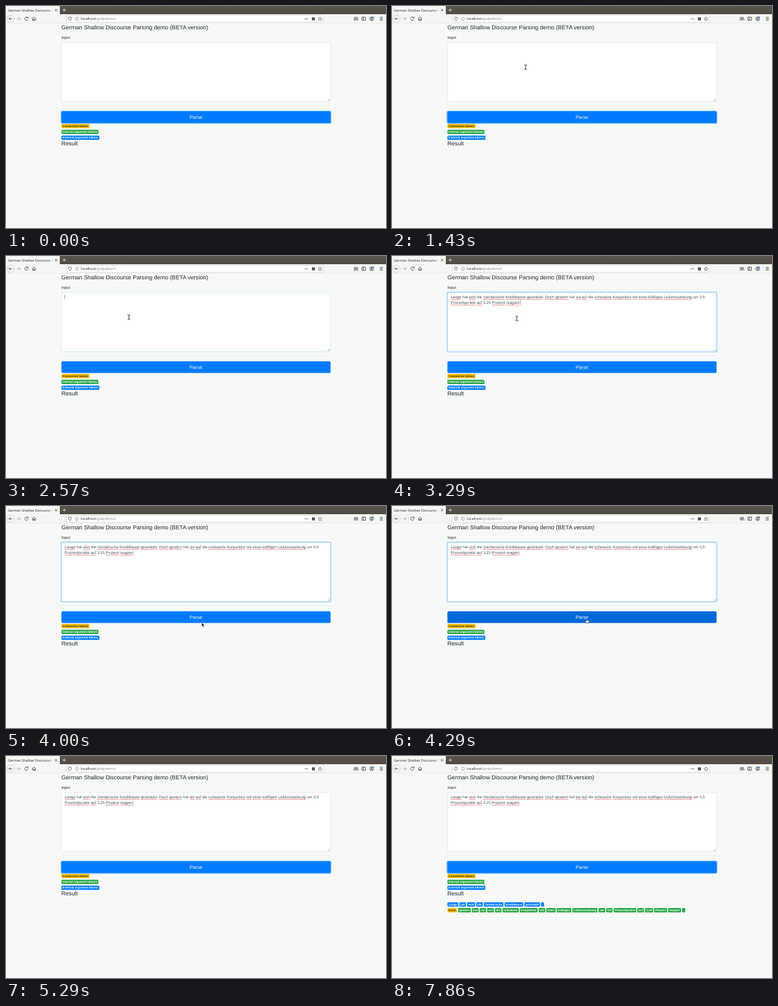
Animation of 600 by 352 pixels, one loop 8000 ms. Source, as an HTML page:

```html
<!DOCTYPE html>
<html lang="en">
<head>
<meta charset="utf-8">
<title>German Shallow Discourse Parsing demo</title>
<style>
  html, body { margin: 0; height: 100%; overflow: hidden; background: #f7f9f8; }
  svg { display: block; width: 100vw; height: 100vh; }
  text { font-family: "Liberation Sans", Arial, sans-serif; text-rendering: geometricPrecision; white-space: pre; }
  .ui { font-family: "Open Sans", "Noto Sans", sans-serif; }
  .icon { fill: none; stroke: #4a4a4a; stroke-width: .9; }
</style>
</head>
<body>
<svg id="stage" viewBox="0 0 600 352">
  <defs>
    <linearGradient id="bar" x2="0" y2="1">
      <stop stop-color="#59554d"/><stop offset="1" stop-color="#4f4b44"/>
    </linearGradient>
    <linearGradient id="fade">
      <stop stop-color="#f6f6f5" stop-opacity="0"/><stop offset="1" stop-color="#f6f6f5"/>
    </linearGradient>
  </defs>
  <rect width="600" height="352" fill="#f7f9f8"/>

  <!-- browser window -->
  <rect width="600" height="13" fill="url(#bar)"/>
  <rect y="13" width="600" height="14.5" fill="#f5f5f4"/>
  <rect width="85" height="13.5" fill="#f6f6f5"/>
  <text class="ui" x="3" y="8.6" font-size="5.42" fill="#222">German Shallow Discourse P</text>
  <rect x="66" y="1" width="9" height="11" fill="url(#fade)"/>
  <rect x="75" y="1" width="9" height="11" fill="#f6f6f5"/>
  <path class="icon" d="M77.2 4.8l3.6 3.6m0-3.6l-3.6 3.6"/>
  <path class="icon" style="stroke:#ddd" d="M92 3.8v5.4m-2.7-2.7h5.4"/>
  <circle cx="7.3" cy="20.2" r="5.7" fill="#fcfcfc" stroke="#aaa" stroke-width=".6"/>
  <path class="icon" d="M10.2 20.2H4.6m2.5-2.5l-2.5 2.5 2.5 2.5"/>
  <path class="icon" style="stroke:#aaa" d="M17 20.2h5.6m-2.5-2.5l2.5 2.5-2.5 2.5"/>
  <path class="icon" d="M34.2 18.4a2.6 2.6 0 1 0 .5 2.4M34.9 17v2h-2.2"/>
  <path class="icon" d="M41.2 20.3l3-2.9 3 2.9m-5 -.6v3.1h1.4v-1.8h1.2v1.8h1.4v-3.1"/>
  <rect x="95.5" y="14.9" width="405.5" height="10.9" rx="1.2" fill="#fff" stroke="#c6c6c5" stroke-width=".6"/>
  <path class="icon" style="stroke-width:.8" d="M101 17.5l2.2.8c0 2.4-.5 3.8-2.2 4.8-1.7-1-2.2-2.4-2.2-4.8z"/>
  <g class="icon" style="stroke:#888;stroke-width:.7"><circle cx="112" cy="20.3" r="2.7"/><path d="M112 19.8v2m0-3.2v.6"/></g>
  <text class="ui" x="118" y="22.3" font-size="5.67" fill="#222">localhost<tspan fill="#858585">/gsdpdemo/</tspan></text>
  <path d="M472 20.3h5" stroke="#444" stroke-width="1.3" stroke-dasharray="1.3 .9"/>
  <rect x="483" y="18" width="4.8" height="4.8" fill="#555"/>
  <path class="icon" style="stroke-width:.7" d="M495.8 17.3l.9 1.9 2.1.3-1.5 1.5.4 2.1-1.9-1-1.9 1 .4-2.1-1.5-1.5 2.1-.3z"/>
  <path class="icon" d="M550 17.5v5.5m1.7-5.5v5.5m1.7-5.5v5.5m1-5.3l1.6 5.3"/>
  <path class="icon" d="M562 17.7h5.6v5h-5.6zm2.3 0v5"/>
  <g class="icon"><circle cx="577.3" cy="20.2" r="2.9"/><path d="M575.5 22q1.8-1.6 3.6 0"/></g>
  <circle cx="577.3" cy="19.4" r="1.1" fill="#4a4a4a"/><circle cx="579.6" cy="18" r="1.2" fill="#0a84ff"/>
  <path class="icon" d="M590.2 18h4.8m-4.8 2.2h4.8m-4.8 2.2h4.8"/>
  <path d="M0 27.3h600" stroke="#dededd" stroke-width=".5"/>

  <!-- page -->
  <g fill="#212529">
    <text x="87.5" y="36.9" font-size="9.1">German Shallow Discourse Parsing demo (BETA version)</text>
    <text x="87.5" y="52.1" font-size="6.12">Input</text>
    <text x="87.5" y="221.4" font-size="9.1">Result</text>
  </g>
  <rect id="inputGlow" x="87" y="57.4" width="426" height="94.6" rx="2" fill="none" stroke="#007bff" stroke-opacity=".3" stroke-width="1.6"/>
  <rect id="input" x="87.7" y="58" width="424.6" height="93.4" rx="1.5" fill="#fff" stroke-width=".5"/>
  <path d="M508 150.5l3-3m-1.2 3l1.2-1.2" stroke="#777" stroke-width=".6"/>
  <path d="M87.5 157.9h425" stroke="#000" stroke-opacity=".1" stroke-width=".5"/>
  <rect id="buttonGlow" x="86.3" y="165.9" width="427.4" height="20.8" rx="2.8" fill="#007bff" fill-opacity=".5"/>
  <rect id="button" x="87.5" y="167.1" width="425" height="18.4" rx="1.8"/>
  <rect id="dots" x="88.4" y="168" width="423.2" height="16.6" fill="none" stroke="#fff" stroke-opacity=".35" stroke-width=".5" stroke-dasharray="1.5 1.5"/>
  <text x="300" y="179" font-size="7.65" fill="#fff" text-anchor="middle">Parse</text>
  <g id="legend"></g>
  <g id="typed"></g>
  <g id="result"></g>
  <path id="caret" stroke="#444" stroke-width=".6"/>

  <!-- pointers, hot spot at 0,0 -->
  <g id="beam"><path d="M-2-3.5h1.3l.7.6.7-.6h1.3M0-3v6M-2 3.5h1.3l.7-.6.7.6h1.3" fill="none" stroke="#222" stroke-width=".9"/></g>
  <g id="arrow"><path d="M0 0v6.8l1.6-1.4 1.1 2.5 1.2-.5-1.1-2.5h2.1z" fill="#222" stroke="#fff" stroke-width=".5"/></g>
  <g id="hand"><path d="M-.7.5q.7-1 1.4 0v2.6l2.6.5q.8.3.6 1.3l-.5 2.5h-3.7l-2.2-2.9q.3-1 1.8.2z" fill="#fff" stroke="#222" stroke-width=".6"/></g>
</svg>
<script>
const $ = id => document.getElementById(id);
const YELLOW = "#ffc107", GREEN = "#28a745", BLUE = "#007bff";
const LEFT = 87.5, SIZE = 6.12, SPACE = SIZE * .278;
const SENTENCES = [
  "Lange hat sich die Vondarische Kreditkasse gesträubt.",
  "Doch gestern hat sie auf die schwache Konjunktur mit einer kräftigen Leitzinssenkung um 0,5 Prozentpunkte auf 3,25 Prozent reagiert."
];

function add(parent, tag, attrs, content = "") {
  const el = document.createElementNS("http://www.w3.org/2000/svg", tag);
  for (const key in attrs) el.setAttribute(key, attrs[key]);
  el.textContent = content;
  return parent.appendChild(el);
}

// Draws a label at x, centred on y, and returns its right edge.
function badge(parent, x, y, label, color) {
  const size = 4.59, pad = size * .4;
  const box = add(parent, "rect", { x, y: y - 3.4, height: 6.8, rx: 1.5, fill: color });
  const text = add(parent, "text", {
    x: x + pad, y: y + 1.65, "font-size": size, "font-weight": "bold",
    fill: color === YELLOW ? "#212529" : "#fff"
  }, label);
  const width = text.getComputedTextLength() + 2 * pad;
  box.setAttribute("width", width);
  return x + width;
}

function buildTyped() {
  const known = ["hat", "die", "um", "0,5", "3,25"];
  let x = 92.6, y = 67.1;
  for (const word of SENTENCES.join(" ").split(" ")) {
    const text = add($("typed"), "text", { x, y, "font-size": SIZE, fill: "#495057" }, word);
    const width = text.getComputedTextLength();
    if (x + width > 507) {
      x = 92.6;
      y += 9.2;
      text.setAttribute("x", x);
      text.setAttribute("y", y);
    }
    if (!known.includes(word)) {
      const length = width - (word.endsWith(".") ? SPACE : 0);
      add($("typed"), "path", { d: `M${x} ${y + 1.6}h${length}`, stroke: "#e0403c", "stroke-width": .75, "stroke-opacity": .8 });
    }
    x += width + SPACE;
  }
  return x - SPACE;
}

["Connective", "Internal argument", "External argument"].forEach((name, i) =>
  badge($("legend"), LEFT, 190.4 + 9.2 * i, name + " tokens", [YELLOW, GREEN, BLUE][i]));
const typedEnd = buildTyped();
SENTENCES.forEach((sentence, row) => {
  let x = LEFT;
  sentence.replace(/\.$/, " .").split(" ").forEach((token, i) => {
    const color = row === 0 ? BLUE : i === 0 ? YELLOW : GREEN;
    x = badge($("result"), x, 235.4 + 9.1 * row, token, color) + SPACE;
  });
});

// Pointer poses: start time, shape, x, y
const POINTER = [
  [0, ""], [290, "beam", 164, 117], [430, "beam", 214, 108],
  [710, "beam", 212, 114], [860, "beam", 207, 118], [1000, "beam", 205, 114],
  [1140, "beam", 208, 107], [1290, "beam", 210, 100], [1430, "beam", 211, 97],
  [1570, "beam", 182, 89], [1710, "beam", 102, 94], [1860, "arrow", 46, 97],
  [2000, "arrow", 70, 99], [2140, "beam", 145, 98], [2290, "beam", 188, 97],
  [2430, "beam", 194, 97], [3290, "beam", 197, 99], [3430, "beam", 216, 122],
  [3570, "hand", 258, 172], [3710, "arrow", 296, 196], [3860, "arrow", 308, 195],
  [4000, "arrow", 309, 184.6], [4140, "hand", 308, 181], [4290, "hand", 307.3, 178.2],
  [5290, ""]
];

const show = (id, on) => $(id).setAttribute("visibility", on ? "visible" : "hidden");

function draw(t) {
  const within = (from, to) => t >= from && t < to;
  const [, shape, x, y] = POINTER.findLast(pose => t >= pose[0]);
  for (const id of ["beam", "arrow", "hand"]) show(id, id === shape);
  if (shape) $(shape).setAttribute("transform", `translate(${x} ${y})`);

  const focused = within(2570, 4860);
  const pressed = within(4860, 5140);
  show("inputGlow", within(2710, 4860));
  $("input").setAttribute("stroke", !focused ? "#ced4da" : t < 2710 ? "#b3d0ea" : "#80bdff");
  show("buttonGlow", t < 2430 || t >= 4860);
  show("dots", pressed);
  $("button").setAttribute("fill", pressed ? "#0062cc" : shape === "hand" ? "#0069d9" : BLUE);

  show("typed", t >= 3000);
  show("result", t >= 7860);
  show("caret", within(2570, 3570) || within(4140, 4290));
  $("caret").setAttribute("d", t < 3000 ? "M92.8 61.4v7" : `M${typedEnd + .3} 70.6v7`);
}

function tick(now) {
  draw(now % 8000);
  requestAnimationFrame(tick);
}
draw(0);
requestAnimationFrame(tick);
</script>
</body>
</html>
```
